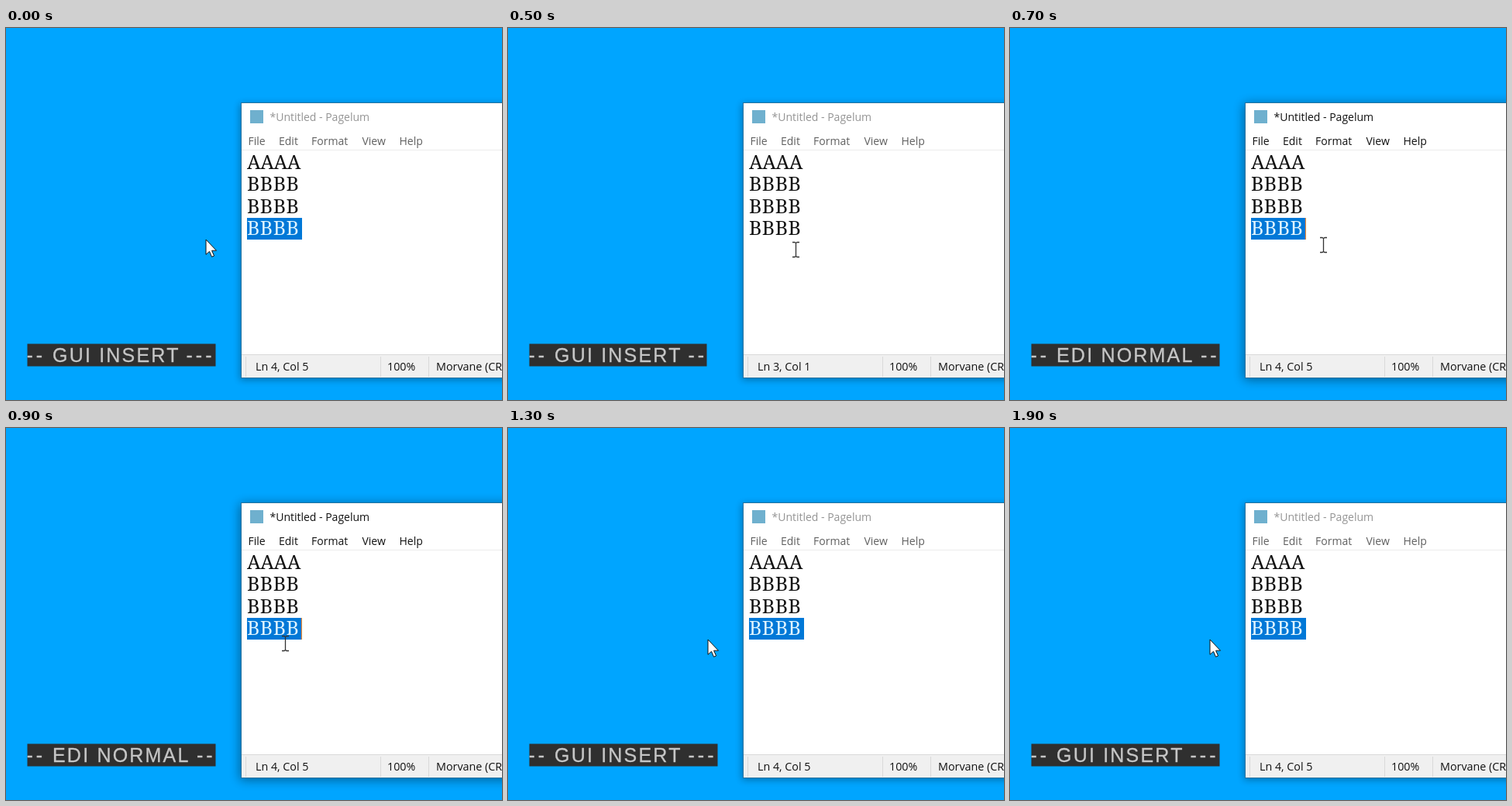
Animation, 640 px wide and 480 px high, one loop 2 s. Source, as an HTML page:

```html
<!DOCTYPE html>
<html lang="en">
<head>
<meta charset="utf-8">
<title>Editor modes</title>
<style>
  html, body { margin: 0; width: 100%; height: 100%; overflow: hidden; background: #00a5ff; }
  svg { display: block; width: 640px; height: 480px; }
  text { white-space: pre; }
  .ui { font: 14px "Open Sans", "Noto Sans", sans-serif; fill: #111; }
  .status { font-size: 14.3px; }
  .menu { fill: #606060; }
  .caption { fill: #949494; }
  .active .menu, .active .caption { fill: #111; }
  .doc { font: 25px "Noto Serif", serif; fill: #111; letter-spacing: .5px; }
  .doc .first { letter-spacing: -.4px; }
  .selected .last { fill: #dff4ff; }
  .label { font: 25px "Liberation Sans", Arial, sans-serif; fill: #c6c6c6; letter-spacing: 2.2px; }
  .label text { stroke: #c6c6c6; stroke-width: .3px; }
  .label .dash { letter-spacing: 4px; }
  .shadow { filter: blur(5px); opacity: .32; }
  .active .shadow { filter: blur(7px); opacity: .42; }
  .selection, .caret { visibility: hidden; }
  .selected .selection, .blink .caret { visibility: visible; }
</style>
</head>
<body>
<svg viewBox="0 0 640 480">
  <defs><clipPath id="labelClip"><rect id="clipBox" x="27.5" y="407.5" height="29"/></clipPath></defs>
  <rect width="640" height="480" fill="#00a5ff"/>
  <g id="app">
    <rect class="shadow" x="302" y="98" width="360" height="356"/>
    <rect x="303.5" y="96.5" width="350" height="355" fill="#fff" stroke="#23729f"/>
    <rect x="315" y="106" width="17" height="17" fill="#6fb0ce"/>
    <text class="ui caption" x="340.500" y="120">*Untitled - Pagelum</text>
    <g class="ui">
      <text class="menu" x="312.500" y="151">File</text>
      <text class="menu" x="352" y="151">Edit</text>
      <text class="menu" x="394" y="151">Format</text>
      <text class="menu" x="459.500" y="151">View</text>
      <text class="menu" x="507.500" y="151">Help</text>
    </g>
    <path d="M304 157.500H640" stroke="#ececec"/>
    <rect class="selection" x="311" y="245" width="71" height="28" fill="#0078d7"/>
    <g class="doc">
      <text class="first" x="311" y="182">AAAA</text>
      <text x="311" y="210">BBBB</text>
      <text x="311" y="239">BBBB</text>
      <text class="last" x="311" y="267">BBBB</text>
    </g>
    <rect class="caret" x="381" y="245" width="1" height="28"/>
    <rect x="304" y="421" width="336" height="30" fill="#f0f0f0"/>
    <path d="M304 421.500H640M309.500 424V450M483.500 424V450M545.500 424V450" stroke="#d9d9d9" fill="none"/>
    <g class="ui status">
      <text id="position" x="322" y="442"></text>
      <text x="492" y="442">100%</text>
      <text x="555" y="442">Morvane (CRLF)</text>
    </g>
  </g>
  <g class="label" clip-path="url(#labelClip)">
    <rect x="27" y="407" width="244" height="30" fill="#2f2f2f"/>
    <text class="dash" x="26.500" y="431">--</text>
    <text id="mode" x="60" y="431"></text>
    <text id="tail" class="dash" y="431"></text>
  </g>
  <path id="arrow" d="M0 0V19.300L4.500 15.300L7.500 22.300L10.600 21L7.600 14.200H13.500Z" fill="#fff" stroke="#111"/>
  <path id="beam" d="M-4 -9.500H-1L.5 -8.500L2 -9.500H5M.5 -8.500V8.500M-4 9.500H-1L.5 8.500L2 9.500H5" fill="none" stroke="#333" stroke-width="1.300"/>
</svg>
<script>
  const LOOP = 2000, STEP = 100;
  const byId = id => document.getElementById(id);
  const app = byId("app");

  // Pointer hotspot at each step; the last one holds.
  const pointer = [
    [258, 273], [218.5, 292.5], [218.5, 292.5], [258, 291], [325, 288], [371, 286],
    [403, 280], [404, 280], [404, 280], [360, 278], [290, 274], [258, 273]
  ];

  function draw(time) {
    const step = Math.floor(time % LOOP / STEP);
    const [x, y] = pointer[Math.min(step, pointer.length - 1)];
    const fresh = step >= 1 && step < 6;
    const active = step >= 6 && step < 12;
    const selected = step < 1 || step >= 7;

    app.classList.toggle("active", active);
    app.classList.toggle("selected", selected);
    app.classList.toggle("blink", step >= 6 && step < 11);
    app.querySelector(".caret").setAttribute("fill", selected ? "#ff8728" : "#111");
    byId("position").textContent = fresh ? "Ln 3, Col 1" : "Ln 4, Col 5";

    byId("mode").textContent = active ? "EDI NORMAL" : "GUI INSERT";
    byId("tail").textContent = active || fresh ? "--" : "---";
    byId("tail").setAttribute("x", active ? 246 : 232.5);
    byId("clipBox").setAttribute("width", fresh ? 229 : 243);

    const inside = x > 304;
    for (const [id, shown] of [["arrow", !inside], ["beam", inside]]) {
      byId(id).setAttribute("transform", `translate(${x} ${y})`);
      byId(id).setAttribute("visibility", shown ? "visible" : "hidden");
    }
  }

  const start = performance.now();
  function tick() {
    draw(performance.now() - start);
    requestAnimationFrame(tick);
  }
  tick();
</script>
</body>
</html>
```
